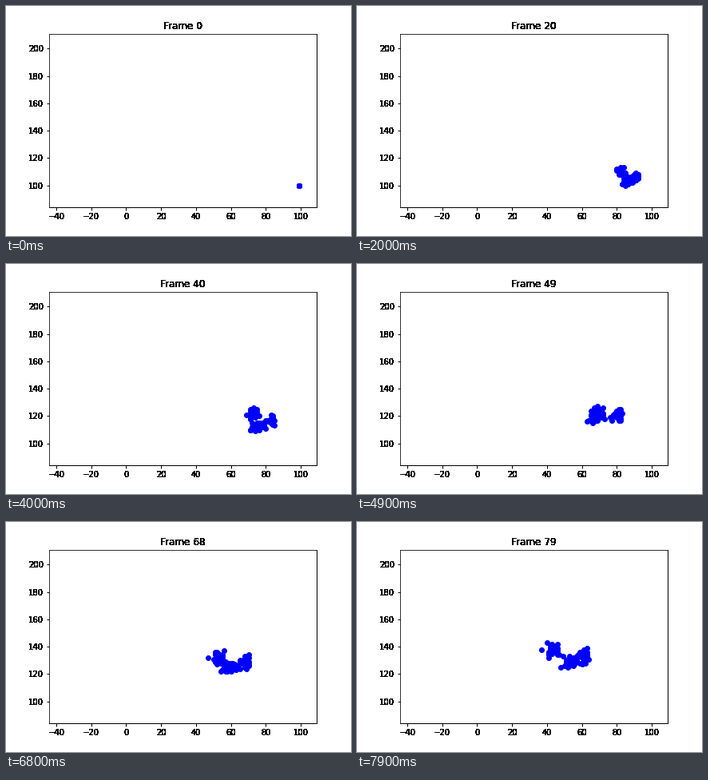
Animation of 432 by 288 pixels, one loop 8 s. Source, as a matplotlib script:

```python
import numpy as np
import matplotlib.pyplot as plt
from matplotlib.animation import FuncAnimation

STEPS = 80
START = (99, 100)
FLOCK_SIZE = 28

# Waypoints of the three flock centres
KEYS = [0, 20, 31, 49, 79]
FLOCKS = [
    [START, (82, 110.5), (76, 120), (69, 123), (43, 137.5)],
    [START, (90, 106), (85, 112), (80, 121), (60, 133)],
    [START, (86, 102.5), (82, 106), (68, 119), (54, 129)],
]


def build_swarm():
    """Whole-number walkers that drift with a flock and spread like sqrt(time)."""
    rng = np.random.default_rng(12)
    steps = np.arange(STEPS)
    spread = 0.3 * np.sqrt(steps)[:, None, None]
    tracks = []
    for flock in FLOCKS:
        path = np.column_stack([np.interp(steps, KEYS, c) for c in zip(*flock)])
        offset = rng.normal(size=(FLOCK_SIZE, 2)).clip(-2.2, 2.2)
        tracks.append(path[:, None] + spread * offset)
    swarm = np.concatenate(tracks, axis=1)
    swarm[1:] += rng.uniform(-0.7, 0.7, swarm[1:].shape)
    return np.rint(swarm)


def hard_edges(img, dpi):
    """Turn every touched pixel solid black."""
    img[..., 3] = img[..., 3] > 0.04
    img[..., :3] = 0
    return img, 0, 0


plt.rcParams["font.family"] = "DejaVu Sans"
fig, ax = plt.subplots(figsize=(6, 4), dpi=72, facecolor="white")
fig.subplots_adjust(left=0.125, right=0.9, bottom=0.125, top=0.88)
ax.set_xlim(-44.1, 109)
ax.set_ylim(84.1, 210.9)
ax.set_xticks(range(-40, 101, 20))
ax.set_yticks(range(100, 201, 20))
ax.tick_params(width=1)

title = ax.set_title("Frame 0", fontsize=12)
labels = ax.get_xticklabels() + ax.get_yticklabels()
for artist in [title, *labels, ax.spines["right"], ax.spines["bottom"]]:
    artist.set_agg_filter(hard_edges)

swarm = build_swarm()
dots, = ax.plot([], [], "bo", markersize=6)


def update(step):
    dots.set_data(*swarm[step].T)
    title.set_text(f"Frame {step}")
    return dots, title


anim = FuncAnimation(fig, update, frames=STEPS, interval=100, repeat=True, repeat_delay=0)
plt.show()
```
